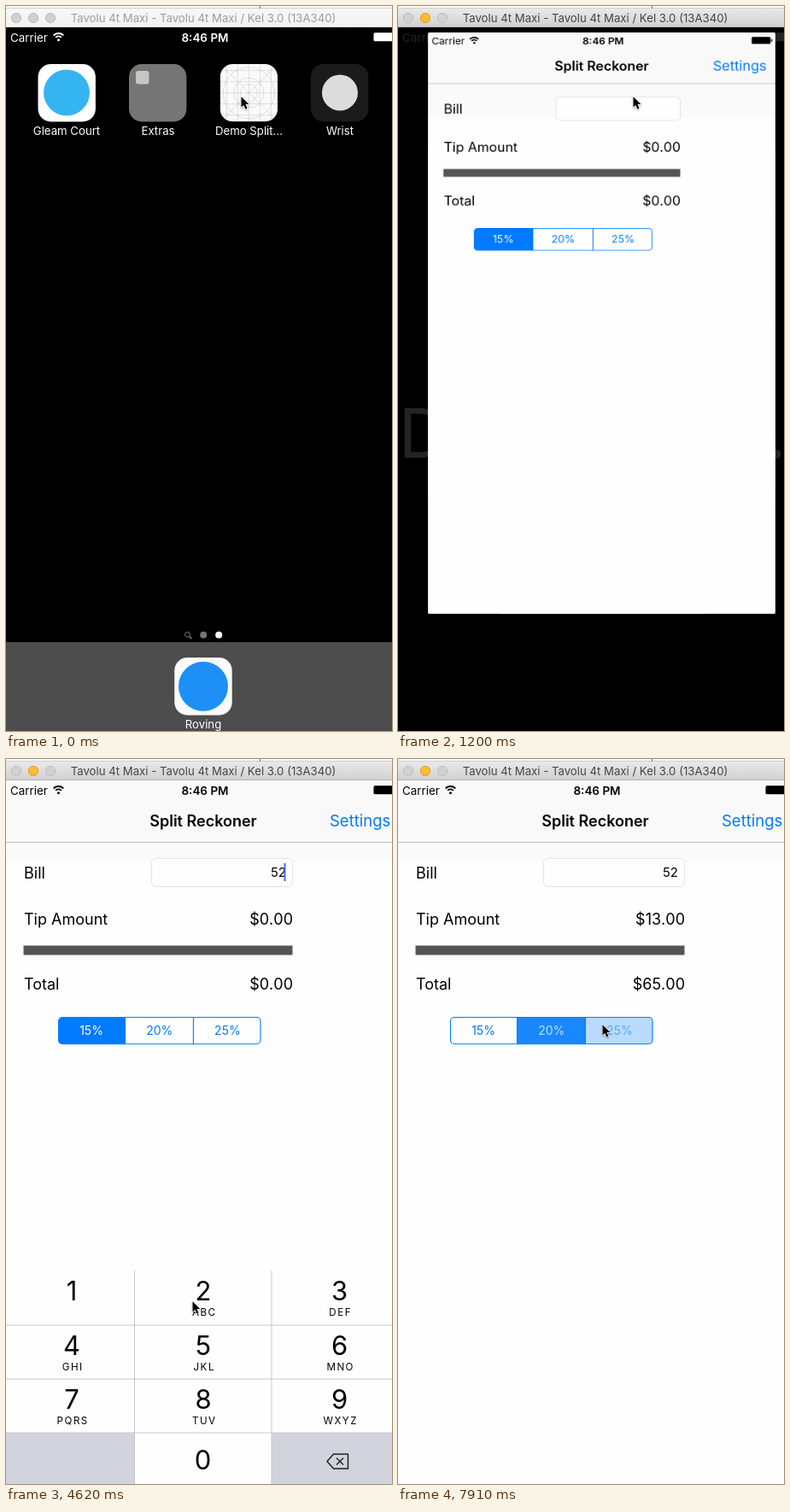
An HTML page with a canvas that plays this animation: 452x849 px, repeating every 8000 ms.

```html
<!DOCTYPE html>
<html lang="en">
<head>
<meta charset="utf-8">
<title>Bill app demo</title>
<style>
html, body { margin: 0; width: 100%; height: 100%; overflow: hidden; background: #000; }
canvas { display: block; width: 452px; height: 849px; }
</style>
</head>
<body>
<canvas id="stage"></canvas>
<script>
const W = 452, H = 849, LOOP = 8000, TICK = 149.25;
const SCREEN = { top: 25, w: 462, h: 824 };
const ICON = { x: 250.7, y: 68, size: 67.4 };
const BLUE = '#007aff';
const FONT = 'Inter, "Open Sans", sans-serif';
const DPR = window.devicePixelRatio || 1;

const makeCanvas = (el, w, h) => {
  el.width = w * DPR;
  el.height = h * DPR;
  return el.getContext('2d');
};
const stage = makeCanvas(document.getElementById('stage'), W, H);
const snapshot = document.createElement('canvas');
const snapCtx = makeCanvas(snapshot, SCREEN.w, SCREEN.h);
let c = stage;

const lerp = (a, b, t) => a + (b - a) * t;
const clamp = v => Math.min(1, Math.max(0, v));
const smooth = t => t * t * (3 - 2 * t);

// Pointer stops: tick, x, y
const POINTER = [
  [0, 275, 105], [11, 275, 105], [15, 282, 130], [19, 282, 130],
  [23, 193, 666], [26, 193, 666], [29, 218, 634], [33, 218, 634],
  [36, 293, 435], [43, 293, 435], [45, 176, 310], [49, 176, 310],
  [52, 239, 310], [60, 239, 310]
];
const ZOOM = [0, 0.42, 0.86, 0.98, 1];

function pointerAt(tick) {
  const i = POINTER.findIndex(p => p[0] > tick);
  const [t0, x0, y0] = POINTER[i - 1], [t1, x1, y1] = POINTER[i];
  const k = smooth((tick - t0) / (t1 - t0));
  return [lerp(x0, x1, k), lerp(y0, y1, k)];
}

function keyboardAt(tick) {
  if (tick < 18 || tick > 38) return 0;
  if (tick < 36) return [0.1, 0.65, 0.93][tick - 18] || 1;
  return [1, 0.55, 0.1][tick - 36];
}

function segmentsAt(tick) {
  if (tick < 47) return [1, 0, 0];
  if (tick === 47) return [1, 0.2, 0];
  if (tick === 48) return [0.9, 0.27, 0];
  if (tick < 52) return [0, 1, 0];
  return tick === 52 ? [0, 1, 0.2] : [0, 0.9, 0.27];
}

function rateAt(tick) {
  if (tick < 36) return 0;
  return tick < 48 ? 0.15 : tick < 53 ? 0.2 : 0.25;
}

function rect(x, y, w, h, fill) {
  c.fillStyle = fill;
  c.fillRect(x, y, w, h);
}

function roundPath(x, y, w, h, r) {
  c.beginPath();
  c.roundRect(x, y, w, h, r);
}

function round(x, y, w, h, r, fill) {
  roundPath(x, y, w, h, r);
  c.fillStyle = fill;
  c.fill();
}

function disc(x, y, r, fill, stroke) {
  c.beginPath();
  c.arc(x, y, r, 0, 7);
  c.fillStyle = fill;
  c.fill();
  if (stroke) outline(stroke);
}

function outline(color, width = 1) {
  c.strokeStyle = color;
  c.lineWidth = width;
  c.stroke();
}

function poly(points) {
  c.beginPath();
  points.forEach(([x, y]) => c.lineTo(x, y));
  c.closePath();
}

function text(str, x, y, size, color, align = 'left', weight = 400, spacing = 0) {
  c.font = `${weight} ${size}px ${FONT}`;
  c.textAlign = align;
  c.letterSpacing = spacing + 'px';
  c.fillStyle = color;
  c.fillText(str, x, y);
}

function titleBar(active) {
  const g = c.createLinearGradient(0, 3, 0, 25);
  g.addColorStop(0, active ? '#e9e9e9' : '#f7f7f7');
  g.addColorStop(1, active ? '#d0d0d0' : '#f2f2f2');
  rect(0, 0, W, 3, '#fafafa');
  rect(0, 2, W, 1, '#cfcfcf');
  rect(297, 0, 1, 3, '#777');
  rect(0, 3, W, 22, g);
  rect(0, 24, W, 1, active ? '#b4b4b4' : '#d8d8d8');
  const grey = active ? '#d2d2d2' : '#d0d0d0';
  [grey, active ? '#fdbc2f' : grey, grey].forEach((fill, i) =>
    disc(12 + 20 * i, 14, 5.6, fill, fill === grey ? '#bdbdbd' : '#dfa023'));
  text('Tavolu 4t Maxi - Tavolu 4t Maxi / Kel 3.0 (13A340)', 231, 19, 13.2,
    active ? '#454545' : '#9c9c9c', 'center');
}

function statusBar(color) {
  text('Carrier', 5, 41.5, 13.4, color);
  text('8:46 PM', 233, 41.5, 13.5, color, 'center', 600);
  disc(61.5, 39.8, 1.5, color);
  [4.6, 8].forEach(r => {
    c.beginPath();
    c.arc(61.5, 40, r, -Math.PI * 0.76, -Math.PI * 0.24);
    outline(color, 1.9);
  });
  round(430.5, 31.3, 25, 10, 1.5, color);
  rect(456.5, 34.5, 1.5, 3.5, color);
}

function tile(x, y, fill) {
  round(x, y, ICON.size, ICON.size, 15, fill);
}

// Construction-grid placeholder icon, drawn around its own centre
function gridIcon(dimmed) {
  const h = ICON.size / 2;
  c.save();
  roundPath(-h, -h, 2 * h, 2 * h, 15);
  c.clip();
  rect(-h, -h, 2 * h, 2 * h, '#fafafa');
  c.beginPath();
  [-26, -13, 0, 13, 26].forEach(d => {
    c.moveTo(d, -h); c.lineTo(d, h);
    c.moveTo(-h, d); c.lineTo(h, d);
  });
  c.moveTo(-h, -h); c.lineTo(h, h);
  c.moveTo(h, -h); c.lineTo(-h, h);
  [10, 17.5, 30].forEach(r => {
    c.moveTo(r, 0);
    c.arc(0, 0, r, 0, 7);
  });
  outline('#c9c9c9', 0.6);
  if (dimmed) rect(-h, -h, 2 * h, 2 * h, 'rgba(0,0,0,.48)');
  c.restore();
}

function home(p, pressed) {
  const scale = lerp(1, SCREEN.w / ICON.size, p);
  const left = lerp(ICON.x, 0, p), top = lerp(ICON.y, SCREEN.top, p);
  const grow = lerp(ICON.size, SCREEN.h * ICON.size / SCREEN.w, p) / ICON.size;
  const half = ICON.size / 2;

  rect(0, 0, W, H, '#000');
  c.save();
  c.translate(left, top);
  c.scale(scale, scale);
  c.translate(-ICON.x, -ICON.y);

  rect(0, 745, W, 110, '#4d4d4d');
  tile(37.5, 68, '#fff');
  disc(71, 101.5, 27, '#35b4f2');
  tile(144, 68, '#757575');
  round(152, 76, 15.5, 15.5, 3, '#c9c6c0');
  tile(357, 68, '#1b1b1b');
  disc(391, 101.5, 21, '#dcdcdc');
  tile(197.3, 763, '#fafafa');
  disc(231, 796.7, 29, '#1e8ff5');

  c.globalAlpha = 1 - p;
  [['Gleam Court', 71, 150.5], ['Extras', 178, 150.5], ['Demo Split...', 284.5, 150.5],
   ['Wrist', 391, 150.5], ['Roving', 231, 845.5]]
    .forEach(([name, x, y]) => text(name, x, y, 13.2, '#fff', 'center'));
  disc(212.5, 736, 3, 'transparent', '#777');
  c.beginPath();
  c.moveTo(214.8, 738.3);
  c.lineTo(217.5, 741);
  outline('#777', 1.6);
  disc(231.2, 736.6, 4, '#757575');
  disc(249.2, 736.6, 4, '#fff');
  c.globalAlpha = 1;

  c.translate(ICON.x + half, ICON.y + half * grow);
  c.scale(1, grow);
  gridIcon(pressed);
  c.restore();

  c.save();
  c.globalAlpha = 1 - p;
  statusBar('#fff');
  c.restore();
  if (p > 0) launchCard(left, top, ICON.size * scale, ICON.size * scale * grow, p);
}

function launchCard(x, y, w, h, p) {
  c = snapCtx;
  c.setTransform(DPR, 0, 0, DPR, 0, -SCREEN.top * DPR);
  app(0);
  c = stage;
  c.save();
  roundPath(x, y, w, h, 11 * (1 - p));
  c.clip();
  c.globalAlpha = clamp(p * 2.1);
  c.drawImage(snapshot, x, y, w, h);
  c.restore();
}

function segments(levels) {
  const edges = [61.5, 139.5, 219.4, 298];
  c.save();
  roundPath(61.5, 302.5, 236.5, 31.3, 4.5);
  c.clip();
  levels.forEach((a, i) => {
    c.globalAlpha = a;
    rect(edges[i], 302, edges[i + 1] - edges[i], 33, BLUE);
  });
  c.restore();
  roundPath(61.5, 302.5, 236.5, 31.3, 4.5);
  outline(BLUE, 1.1);
  edges.slice(1, 3).forEach(x => rect(x - 0.55, 302, 1.1, 32, BLUE));
  ['15%', '20%', '25%'].forEach((label, i) => {
    const a = levels[i];
    const color = a === 1 ? '#fff' : a > 0.5 ? '#c5e1ff' : a > 0 ? '#5ba8f8' : BLUE;
    text(label, 100 + 79.7 * i, 323, 14, color, 'center');
  });
}

function keyboard(k, pressed) {
  const cols = [0, 151, 311, 462], centers = [77, 231, 390.5], rows = [599, 663, 726, 789, 853];
  const letters = ['', 'ABC', 'DEF', 'GHI', 'JKL', 'MNO', 'PQRS', 'TUV', 'WXYZ'];
  c.save();
  c.translate(0, (1 - k) * 252);
  rect(0, 599, SCREEN.w, 254, '#fefefe');
  letters.forEach((sub, i) => {
    const col = i % 3, row = Math.floor(i / 3);
    if (pressed === i + 1) {
      rect(cols[col], rows[row], cols[col + 1] - cols[col], rows[row + 1] - rows[row], '#d1d5db');
    }
    text(i + 1, centers[col], rows[row] + 35, 31, '#000', 'center');
    text(sub, centers[col] + 1.2, rows[row] + 52.5, 11.6, '#000', 'center', 400, 1.5);
  });
  rect(0, 789, 151, 64, '#d1d4dc');
  rect(311, 789, 151, 64, '#d1d4dc');
  text('0', 230.5, 832, 31, '#000', 'center');
  [663, 726, 789].forEach(y => rect(0, y - 0.5, SCREEN.w, 1, '#cbcbcf'));
  [150, 310.5].forEach(x => rect(x, 599, 1, 254, '#c6c6ca'));

  poly([[376, 822.5], [383.5, 814], [400.5, 814], [400.5, 831], [383.5, 831]]);
  c.lineJoin = 'round';
  outline('#1c1c1c', 1.4);
  c.beginPath();
  c.moveTo(387, 818.5); c.lineTo(395, 826.5);
  c.moveTo(395, 818.5); c.lineTo(387, 826.5);
  outline('#1c1c1c', 1.4);
  c.restore();
}

function amount(value, y) {
  c.fontKerning = 'none';
  text('$' + value.toFixed(2), 336, y, 18, '#000', 'right');
  c.fontKerning = 'auto';
}

function app(tick) {
  const rate = rateAt(tick);
  const bill = tick < 26 ? '' : tick < 31 ? '5' : '52';
  const caret = (tick >= 18 && tick < 22) || (tick >= 25 && tick < 36);
  const key = tick === 25 ? 5 : tick === 30 ? 2 : 0;

  rect(0, 25, SCREEN.w, H, '#fefefe');
  rect(0, 25, SCREEN.w, (tick < 18 ? 145 : 121) - 25, '#fafafa');
  rect(0, 25, SCREEN.w, 72, '#f9f9f9');
  rect(0, 97, SCREEN.w, 1, '#c4c4c4');
  statusBar('#000');
  text('Split Reckoner', 231, 79, 18, '#000', 'center', 600);
  text('Settings', 379, 79, 18.5, BLUE);

  roundPath(170.5, 116.5, 165, 33, 5);
  c.fillStyle = '#fefefe';
  c.fill();
  outline('#e3e3e3');
  text('Bill', 21, 139.5, 18, '#000');
  text(bill, 328, 138, 15, '#000', 'right');
  if (caret) rect(325.5, 122, 2, 21, '#4566f2');

  text('Tip Amount', 21, 193.5, 18, '#000');
  amount(52 * rate, 193.5);
  rect(20.5, 218.5, 315, 11, '#545454');
  text('Total', 21, 270, 18, '#000');
  amount(rate ? 52 * (1 + rate) : 0, 270);
  segments(segmentsAt(tick));

  const k = keyboardAt(tick);
  if (k > 0) keyboard(k, key);
}

function pointer([x, y]) {
  c.save();
  c.translate(x + 0.5, y + 1.2);
  c.scale(0.82, 0.82);
  poly([[0, 0], [0, 15], [3.4, 11.8], [6, 17.6], [8.6, 16.5], [6.1, 10.8], [10.8, 10.8]]);
  c.shadowColor = 'rgba(0,0,0,.35)';
  c.shadowBlur = 2 * DPR;
  c.shadowOffsetY = DPR;
  c.lineJoin = 'round';
  outline('#fff', 1.8);
  c.shadowColor = 'transparent';
  c.fillStyle = '#000';
  c.fill();
  c.restore();
}

function draw(ms) {
  const tick = Math.floor((ms % LOOP + 6.8) / TICK);
  const p = tick < 6 ? 0 : ZOOM[Math.min(tick - 6, 4)];
  c = stage;
  c.setTransform(DPR, 0, 0, DPR, 0, 0);
  if (p < 1) home(p, tick >= 6);
  else app(tick);
  titleBar(tick >= 6);
  pointer(pointerAt(tick));
}

const start = performance.now();
function loop() {
  draw(performance.now() - start);
  requestAnimationFrame(loop);
}
loop();
</script>
</body>
</html>
```
